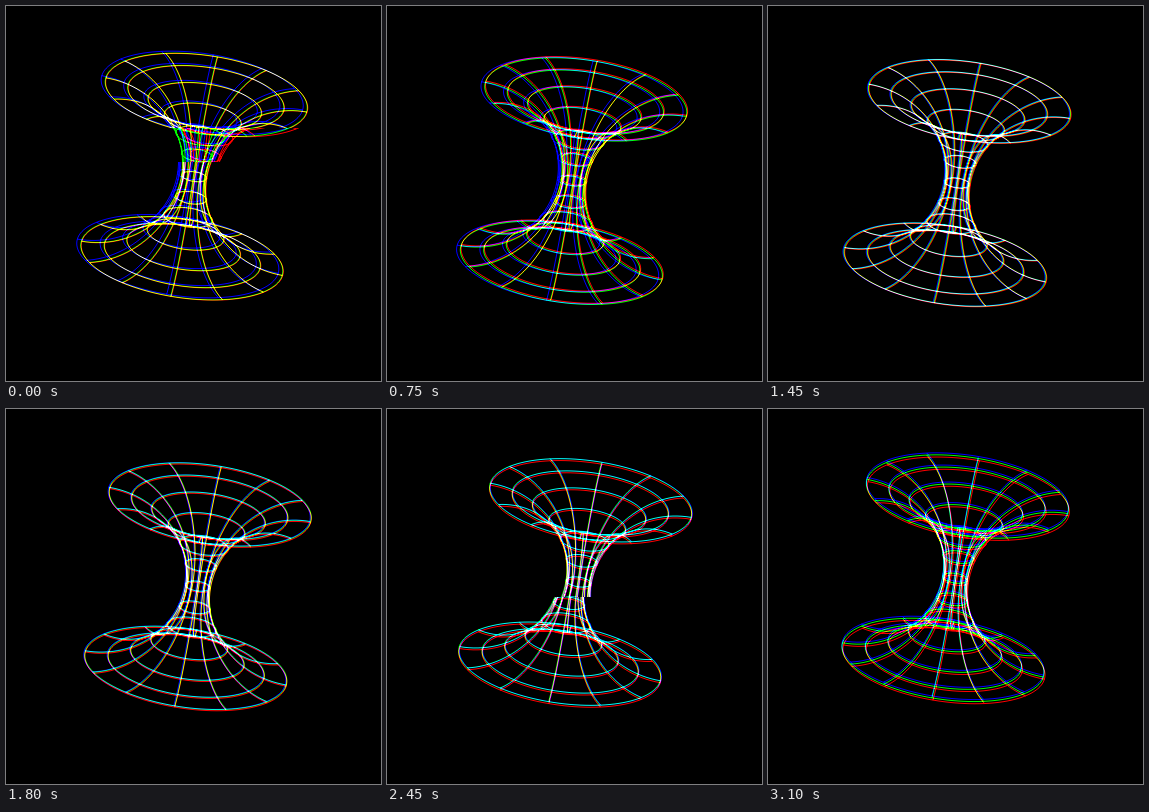
An HTML page with a canvas for the animation above (3150 ms loop, 375 by 375 pixels).

```html
<!DOCTYPE html>
<html>
<head>
<meta charset="utf-8">
<style>
html, body { margin: 0; width: 100%; height: 100%; overflow: hidden; background: #000; }
canvas { display: block; }
</style>
</head>
<body>
<canvas id="stage" width="375" height="375"></canvas>
<script>
const SIZE = 375, LOOP = 3150, STEP = 50;
const ctx = document.getElementById('stage').getContext('2d');
const rad = Math.PI / 180;

// Inner half of a torus, tilted towards the viewer and leaned sideways.
const THROAT = 12.5, CURVE = 89.5, TILT = 0.385, LEAN = 8.5 * rad;

function project(lat, lon) {
  const r = THROAT + CURVE * (1 - Math.cos(lat * rad));
  const z = CURVE * Math.sin(lat * rad);
  const x = r * Math.cos(lon * rad);
  const y = r * Math.sin(lon * rad) * TILT - z * Math.sqrt(1 - TILT * TILT);
  return [x * Math.cos(LEAN) - y * Math.sin(LEAN), x * Math.sin(LEAN) + y * Math.cos(LEAN)];
}

const mesh = new Path2D();
function addLine(from, to, point) {
  mesh.moveTo(...point(from));
  for (let a = from + 3; a <= to; a += 3) mesh.lineTo(...point(a));
}
for (let lat = -90; lat <= 90; lat += 15) addLine(0, 360, lon => project(lat, lon));
for (let lon = 3; lon < 360; lon += 30) addLine(-90, 90, lat => project(lat, lon));

// time, centre x y, red offset x y, blue offset x y
const drift = [
  [0, 188, 170.5, 0.5, 0.3, -4, -2],
  [500, 187, 174, 0.3, -2, -6, -1],
  [1050, 186, 176.5, 1.5, -0.2, -1, 0],
  [1800, 192, 177.2, 0, 1.2, -1, -0.2],
  [2200, 193, 175, 0, 1.8, 0.7, 0],
  [2700, 189.8, 171, 0.3, 2, 0.8, 0],
  [3100, 187.2, 169.2, 1, 2.2, 0, -2],
  [LOOP, 188, 170.5, 0.5, 0.3, -4, -2]
];

// Torn bands: start, end, top, bottom, shift of green, shift of red and blue
const tears = [
  [0, 750, 122, 156, 0, 8],
  [2000, 2450, 193, SIZE, -6.3, -6.3],
  [2450, 2900, 188, SIZE, -6.5, -6.5]
];

function driftAt(t) {
  const i = drift.findIndex(k => k[0] > t);
  const a = drift[i - 1], b = drift[i];
  const p = (t - a[0]) / (b[0] - a[0]);
  return a.map((v, j) => v + (b[j] - v) * p);
}

function strip(top, bottom, x, y) {
  if (bottom <= top) return;
  ctx.save();
  ctx.beginPath();
  ctx.rect(0, top, SIZE, bottom - top);
  ctx.clip();
  ctx.translate(x, y);
  ctx.stroke(mesh);
  ctx.restore();
}

function draw(t) {
  const [, x, y, rx, ry, bx, by] = driftAt(t);
  const [, , top, bottom, green, others] =
    tears.find(k => t >= k[0] && t < k[1]) || [0, 0, 0, 0, 0, 0];
  ctx.globalCompositeOperation = 'source-over';
  ctx.fillStyle = '#000';
  ctx.fillRect(0, 0, SIZE, SIZE);
  ctx.globalCompositeOperation = 'lighter';
  ctx.lineWidth = 1;
  const channel = (color, dx, dy, shift) => {
    ctx.strokeStyle = color;
    strip(0, top, x + dx, y + dy);
    strip(top, bottom, x + dx + shift, y + dy);
    strip(bottom, SIZE, x + dx, y + dy);
  };
  channel('#f00', rx, ry, others);
  channel('#0f0', 0, 0, green);
  channel('#00f', bx, by, others);
}

const start = performance.now();
function tick() {
  const t = (performance.now() - start) % LOOP;
  draw(Math.floor(t / STEP) * STEP);
  requestAnimationFrame(tick);
}
tick();
</script>
</body>
</html>
```
